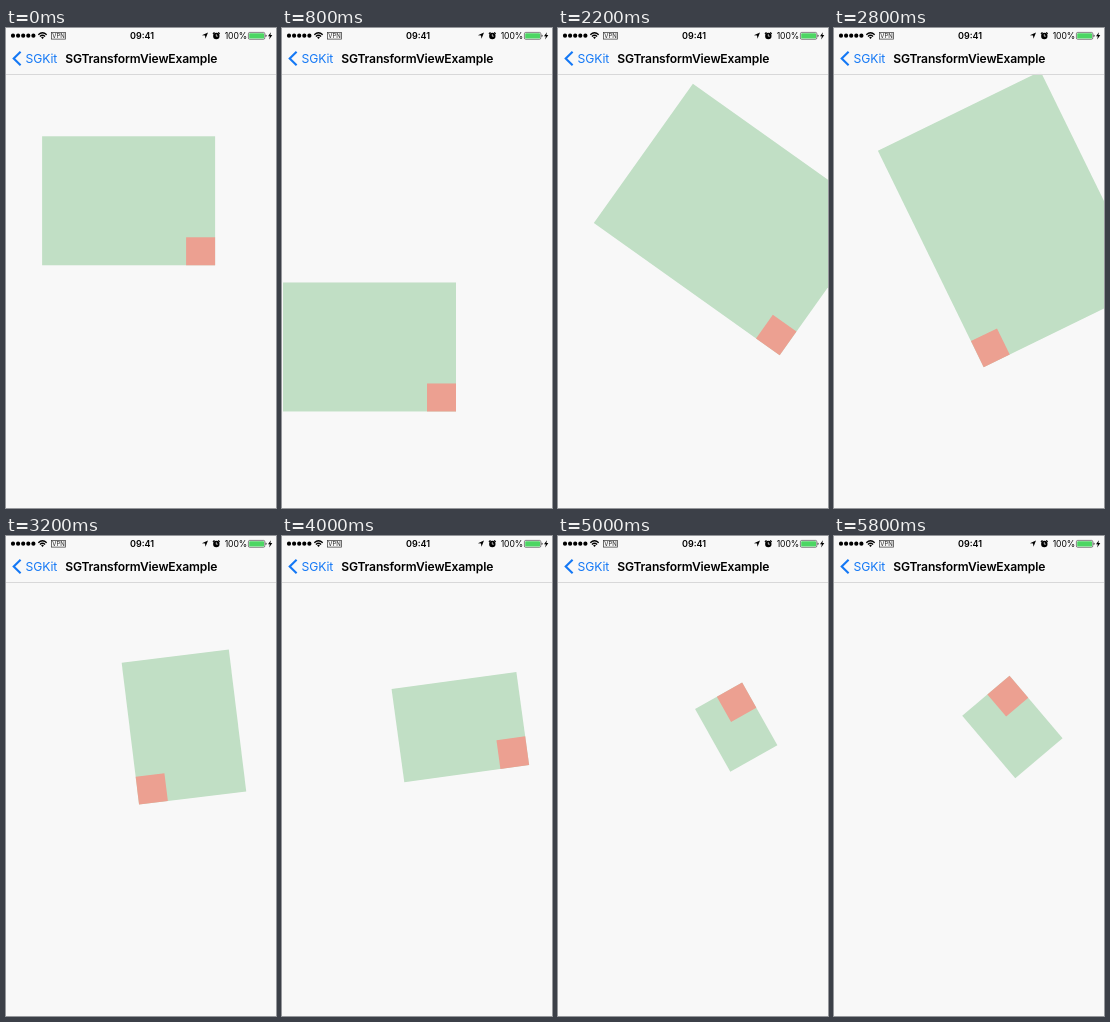
An HTML page for the animation above (6000 ms loop, 270 by 480 pixels).

```html
<!DOCTYPE html>
<html lang="en">
<head>
<meta charset="utf-8">
<title>Transform view</title>
<style>
  html, body { margin: 0; width: 100%; height: 100%; overflow: hidden; background: #f8f8f8; }
  #stage { position: relative; width: 270px; height: 480px; overflow: hidden; background: #f8f8f8; }
  #box { position: absolute; left: 0; top: 0; background: #c1dfc5; }
  #handle { position: absolute; right: 0; bottom: 0; width: 28.8px; height: 28.8px; background: #eca091; }
  #bar {
    position: absolute; left: 0; top: 0; width: 270px; height: 46px;
    background: rgba(248, 248, 248, .85); backdrop-filter: blur(14px);
    border-bottom: 1px solid #d8d8d9;
  }
  svg { position: absolute; left: 0; top: 0; }
  text { font-family: Inter, "Liberation Sans", sans-serif; }
</style>
</head>
<body>
<div id="stage">
  <div id="box"><div id="handle"></div></div>
  <div id="bar"></div>
  <svg width="270" height="47" viewBox="0 0 270 47">
    <!-- status bar -->
    <path d="M7 7.7h20.5" stroke="#000" stroke-width="4.2" stroke-linecap="round" stroke-dasharray="0 5.1"/>
    <path d="M32.3 6.7Q36.5 2.8 40.7 6.7M33.9 8.4Q36.5 6 39.1 8.4" fill="none" stroke="#000" stroke-width="1.3"/>
    <path d="M35.1 9.4Q36.5 8.2 37.9 9.4L36.5 10.9z"/>
    <rect x="45.5" y="4.5" width="14" height="6.6" fill="none" stroke="#333" stroke-width=".7"/>
    <text x="52.5" y="10" font-size="6" text-anchor="middle" fill="#222">VPN</text>
    <text x="136" y="11" font-size="9" font-weight="600" text-anchor="middle">09:41</text>
    <path d="M202 4.6L199.5 10.8L199 7.6L195.9 7.2z"/>
    <circle cx="210.3" cy="8" r="3.2"/>
    <path d="M206.9 5.8L208.5 4.4M213.7 5.8L212.1 4.4" stroke="#000" stroke-width="1.2"/>
    <path d="M210.3 6.2V8.2H211.8" fill="none" stroke="#fff" stroke-width=".7"/>
    <text x="218.7" y="11" font-size="8.6" letter-spacing="-.1">100%</text>
    <rect x="242.4" y="4.4" width="16.4" height="6.9" rx="1.3" fill="#fff" stroke="#333" stroke-width=".6"/>
    <rect x="243.2" y="5.2" width="14.8" height="5.3" rx=".6" fill="#4cd663"/>
    <path d="M259.5 6.6q1.2 .2 1.2 1.2t-1.2 1.2z" fill="#333"/>
    <path d="M264.9 4.2L262 8.3H263.8L263.2 11.5L266.3 7.1H264.4z"/>
    <!-- navigation -->
    <path d="M14.6 23.7L7.7 30.5L14.6 37.3" fill="none" stroke="#1478f5" stroke-width="2.1"/>
    <text x="19.6" y="35" font-size="12.2" letter-spacing="-.15" fill="#1478f5">SGKit</text>
    <text x="59.2" y="35" font-size="12.1" font-weight="600" letter-spacing="-.16">SGTransformViewExample</text>
  </svg>
</div>
<script>
  const STEP = 200, LOOP = 6000, WIDTH = 172.6;
  const home = { x: 122.4, y: 173 }, low = { x: 87.3, y: 319.2 }, rest = { x: 178.2, y: 191.2 };
  const box = document.getElementById("box");

  const mix = (a, b, k) => a + (b - a) * k;
  const progress = (t, from, to) => Math.min(1, Math.max(0, (t - from) / (to - from)));

  // Linear track through [time, value] points, held at both ends
  const track = (...points) => t => points.reduce(
    (v, [time, value], i) => i ? mix(v, value, progress(t, points[i - 1][0], time)) : value, 0);

  const pinch = track([1400, WIDTH], [2200, 227.6], [2600, 290], [3200, 143.4], [4000, 125.7],
    [4400, 222], [5000, 71.8], [5400, 267], [5800, 82]);
  const turn = track([1400, 0], [2200, 35.4], [3200, 83], [4000, -7.8], [5000, -119.3], [5800, -130.3]);

  // Drag down first, then up to the resting place
  function drag(t, axis) {
    const down = mix(home[axis], low[axis], progress(t, 200, 800));
    return mix(down, rest[axis], progress(t, 800, 1220));
  }

  function draw(now) {
    const t = Math.floor((now % LOOP) / STEP) * STEP;
    const w = pinch(t);
    box.style.width = w + "px";
    box.style.height = w * .75 + "px";
    box.style.transformOrigin = "0 0";
    box.style.transform =
      `translate(${drag(t, "x")}px, ${drag(t, "y")}px) rotate(${turn(t)}deg) translate(-50%, -50%)`;
  }

  const start = performance.now();
  function tick() {
    draw(performance.now() - start);
    requestAnimationFrame(tick);
  }
  tick();
</script>
</body>
</html>
```
